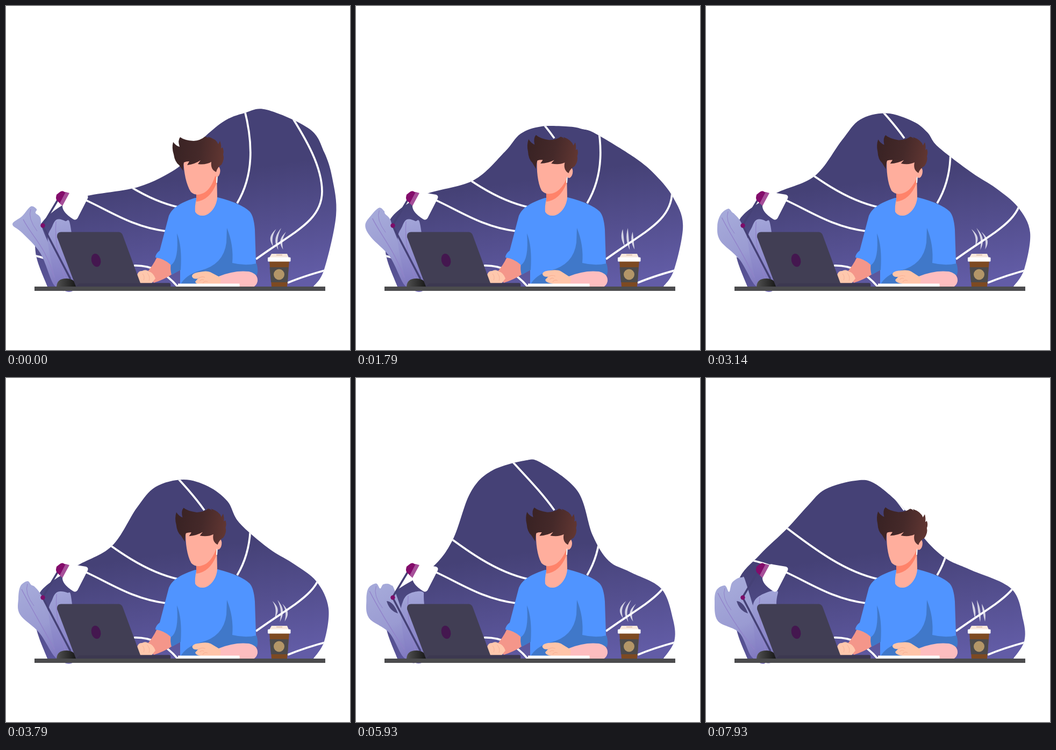
These frames come from a looping animation (640 px wide and 640 px high, 8 s). An HTML page with a canvas:

```html
<!DOCTYPE html>
<html lang="en">
<head>
<meta charset="utf-8">
<title>Working at a desk</title>
<style>
html, body { margin: 0; width: 100%; height: 100%; overflow: hidden; background: #fff; }
canvas { display: block; width: 100vw; height: 100vh; }
</style>
</head>
<body>
<canvas id="stage"></canvas>
<script>
const LOOP = 8000;
const canvas = document.getElementById('stage');
const ctx = canvas.getContext('2d');
const ratio = window.devicePixelRatio || 1;
canvas.width = canvas.height = 640 * ratio;

const pose = (time, text) => ({ time, points: text.split(' ').map(p => p.split(',').map(Number)) });

// The hill drifts between four key shapes; its feet stay put.
const hill = [
  pose(0, '66,404 130,359 245,337 315,304 334,283 352,260 403,216 444,199 485,193 565,229 592,272 607,320 614,390'),
  pose(2500, '62,395 122,350 207,320 262,258 295,220 341,210 395,228 412,241 430,255 500,303 545,333 583,370 606,415'),
  pose(5930, '66,404 140,354 180,301 212,215 250,174 312,154 345,158 412,210 440,292 470,340 510,361 568,392 590,450'),
  pose(7930, '60,378 100,329 151,280 190,237 222,207 278,191 315,197 370,245 405,297 445,335 490,356 568,392 590,450')
];
const leftFoot = [[77, 522], [55, 458]];
const rightFoot = [[592, 490], [572, 522]];

const bigLeaf = [
  pose(0, '12,406 30,391 46,373 57,378 55,385 64,394 70,420 112,520 90,520 64,460 30,422'),
  pose(3790, '23,410 27,387 40,378 47,385 53,388 63,400 74,422 112,520 92,520 62,474 26,440'),
  pose(7930, '16,415 20,394 35,386 43,398 49,380 66,371 76,386 112,520 86,520 62,474 22,452')
];
const smallLeaf = [
  pose(3000, '78,440 86,410 95,397 110,400 120,410 130,520 98,520'),
  pose(7930, '88,450 88,420 102,404 132,396 131,421 130,520 98,520')
];

const strands = [
  'M443 190 C460 255 461 315 430 367',
  'M145 275 C205 321 260 361 320 374',
  'M80 338 C165 355 210 408 298 419',
  'M526 197 C560 250 588 300 588 345 C588 400 535 420 465 471',
  'M524 515 Q560 500 612 487',
  'M238 483 C270 482 298 497 320 523',
  'M50 464 Q62 466 70 469',
  'M285 149 C315 182 345 212 369 246'
].map(d => new Path2D(d));

const lerp = (a, b, k) => a + (b - a) * k;
const clamp = x => Math.max(0, Math.min(1, x));

function blend(poses, t) {
  let i = 0;
  while (i < poses.length - 2 && t > poses[i + 1].time) i++;
  const a = poses[i], b = poses[i + 1];
  const k = clamp((t - a.time) / (b.time - a.time));
  return a.points.map(([x, y], n) => [lerp(x, b.points[n][0], k), lerp(y, b.points[n][1], k)]);
}

function smooth(pts, closed) {
  const n = pts.length, path = new Path2D();
  const at = i => closed ? pts[(i + n) % n] : pts[Math.max(0, Math.min(n - 1, i))];
  path.moveTo(...pts[0]);
  for (let i = 0; i < (closed ? n : n - 1); i++) {
    const [a, b, c, d] = [at(i - 1), at(i), at(i + 1), at(i + 2)];
    path.bezierCurveTo(
      b[0] + (c[0] - a[0]) / 6, b[1] + (c[1] - a[1]) / 6,
      c[0] - (d[0] - b[0]) / 6, c[1] - (d[1] - b[1]) / 6, c[0], c[1]);
  }
  path.closePath();
  return path;
}

function gradient(x0, y0, x1, y1, ...colors) {
  const g = ctx.createLinearGradient(x0, y0, x1, y1);
  colors.forEach((c, i) => g.addColorStop(i / (colors.length - 1), c));
  return g;
}

function fill(shape, color) {
  ctx.fillStyle = color;
  ctx.fill(typeof shape === 'string' ? new Path2D(shape) : shape);
}

function stroke(shape, color, width) {
  ctx.strokeStyle = color;
  ctx.lineWidth = width;
  ctx.stroke(typeof shape === 'string' ? new Path2D(shape) : shape);
}

function oval(x, y, rx, ry, color, turn = 0) {
  ctx.beginPath();
  ctx.ellipse(x, y, rx, ry, turn, 0, Math.PI * 2);
  ctx.fillStyle = color;
  ctx.fill();
}

function rect(x, y, w, h, color) {
  ctx.fillStyle = color;
  ctx.fillRect(x, y, w, h);
}

function rotated(x, y, degrees, draw) {
  ctx.save();
  ctx.translate(x, y);
  ctx.rotate(degrees * Math.PI / 180);
  ctx.translate(-x, -y);
  draw();
  ctx.restore();
}

function drawBackdrop(t) {
  const shape = smooth([...leftFoot, ...blend(hill, t), ...rightFoot], false);
  ctx.save();
  fill(shape, gradient(322, 322, 355, 535, '#454176', '#625ca6'));
  ctx.clip(shape);
  strands.forEach(s => stroke(s, '#fff', 3.7));
  ctx.restore();
}

function drawPlant(t) {
  const vein = '#9182ca';
  const big = blend(bigLeaf, t), small = blend(smallLeaf, t);
  fill(smooth(big, true), gradient(45, 390, 105, 520, '#a5a9d9', '#9a9bd2', '#7f77bf'));

  // The leaf's fold opens late in the loop.
  const gap = clamp((t - 4800) / 1100);
  ctx.save();
  ctx.translate(57, 415);
  ctx.scale(gap, gap);
  fill('M0 0 Q13 1 21 23 Q5 18 0 0 Z', '#4a467c');
  ctx.restore();

  const [x, y] = big[1], [lx, ly] = big[10], [tx, ty] = big[2];
  stroke(`M${x + 2} ${y + 6} C${x + 18} ${y + 38} ${lx + 42} ${ly + 22} 90 505`, vein, 1.3);
  stroke(`M${tx} ${ty + 5} Q${tx - 6} ${ty + 22} ${tx + 12} ${ty + 46}`, vein, 1);

  fill(smooth(small, true), gradient(95, 395, 110, 520, '#a3a6d9', '#8079c1'));
  const [sx, sy] = small[2];
  stroke(`M${sx - 2} ${sy + 4} Q${sx - 6} 450 112 512`, vein, 1.3);
}

function drawLamp() {
  stroke('M120 508 L68 408 L98 358', '#454176', 3.6);
  oval(68.5, 408.5, 4.2, 4.2, '#7d0d69');
  fill('M94 522 Q95 507 112 507 Q129 507 131 522 Z', gradient(94, 515, 131, 515, '#515151', '#161616'));
  fill('M117 348 Q120 345 125 347 L149 351 Q154 353 152 358 L133 395 Q129 400 124 396 Q104 383 105 371 Z', '#fff');
  fill('M99 347 Q104 342 109 346 L113 347 L102 369 L97 364 Q91 361 94 351 Z', '#830c6b');
  fill('M111 346 L118 348 L105 372 L100 367 Z', '#a64f99');
}

function drawBody() {
  const shirt = '#5094ff', shade = '#4078c9', skin = '#ffae9d';
  fill('M281 467 L308 474 L309 499 Q294 509 275 515 L261 497 Q273 484 281 467 Z', '#f4968a');
  fill('M246 516 L244 501 Q246 492 253 493 Q260 489 266 494 Q274 496 278 507 L271 516 Z', '#ffc8ad');
  stroke('M254 498 Q259 504 256 510 M263 497 Q269 504 266 511', '#f7b39a', 1);
  fill('M352 357 C330 364 307 374 302 394 L286 455 Q278 461 278 468 Q294 470 306 481 L308 500 L324 491 L324 522 L398 522 L466 499 Q469 488 465 478 L463 416 Q461 390 453 382 Q437 367 394 356 Z', shirt);
  fill('M318 423 Q328 447 325 491 L308 500 Q305 489 307 482 Q322 472 318 423 Z', shade);
  fill('M411 413 Q424 445 421 478 Q445 484 466 479 Q470 490 467 500 L398 522 L324 519 Q334 500 362 492 Q405 481 410 440 Z', shade);
  fill('M354 338 L354 360 Q351 372 352 383 Q357 391 367 390 C380 389 392 373 393 356 L392 310 Z', skin);
  fill('M354 345 L354 364 Q379 361 391 331 L391 315 Z', '#ff836a');
  stroke('M393 315 L392 329', '#fff', 2);
}

function drawHead(sway) {
  rotated(372, 360, 6.3 * sway, () => {
    oval(393, 308, 5.4, 10, '#ffae9d', 0.1);
    fill('M330 287 C331 310 335 332 344 346 Q352 353 362 350 C378 346 386 329 391 309 L391 280 Z', '#ffae9d');
    fill('M311 253 Q316 260 323 262 Q319 250 324 244 Q332 250 349 251 Q362 250 370 243 Q373 243 377 246 L375 243 Q391 247 395 257 L398 251 Q401 259 400 265 L403 263 Q406 270 404 276 Q407 285 401 295 Q393 300 391 309 Q380 304 382 290 Q372 296 357 294 L362 287 Q352 294 337 296 L341 289 Q335 289 331 291 Q329 298 330 307 L322 296 Q314 290 312 276 Q308 264 311 253 Z',
      gradient(316, 270, 404, 280, '#3a2324', '#452929', '#613632'));
  });
}

function drawRightArm(sway) {
  fill('M396 503 Q425 491 452 494 Q469 498 468 512 Q466 521 459 523 L394 522 Z', '#fdbdbf');
  rotated(396, 512, 6 * sway, () => {
    fill('M346 503 Q346 497 360 495 Q373 492 380 495 L399 505 Q401 512 396 523 L364 519 Q353 518 352 513 L357 507 Q348 509 346 503 Z', '#ffc5a9');
    stroke('M357 507 Q364 502 370 505 M360 512 Q364 507 368 510 M366 516 Q370 510 375 513', '#f8b094', 1);
  });
}

function drawLaptop() {
  fill('M95 430 Q94 421 102 420.5 L210 420.5 Q215 421 217 426 L250 515.5 L304 515.5 Q307 516 306 522 L130 522 Z', '#413e54');
  fill('M136 516 L304 515.5 Q307 516 306 522 L130 522 Z', '#3c3850');
  oval(167.5, 473, 8.6, 12.4, '#44174f', -0.25);
}

function drawSteam(t) {
  const angle = Math.PI * 2 * t / 5700;
  const lean = Math.cos(angle), bend = -Math.cos(angle - 0.87);
  for (const [x, top, end] of [[498, 415, 447], [507.5, 413, 454], [516.5, 420, 453]]) {
    const x0 = x + 4.5 * lean, x1 = x + 1 - 2 * lean;
    const h = end - top, ya = top + h * 0.4, yb = top + h * 0.65;
    const a = x + 8 * bend - lean, b = x + 6 * bend - 2 * lean;
    fill(`M${x0} ${top} C${a - 3} ${ya} ${b - 2.5} ${yb} ${x1} ${end} C${b + 2.5} ${yb} ${a + 3} ${ya} ${x0} ${top} Z`,
      'rgba(255,255,255,.74)');
  }
}

function drawCup() {
  fill('M490 474 L527 474 L523 522 L494 522 Z', '#7d4a22');
  fill('M490.5 486 L525.5 486 L524 514 L493 514 Z', '#4c4a4a');
  oval(508, 499.5, 10, 10, '#b39668');
  fill('M494 461 L523 461 L526 468 L490 468 Z', '#f8e9dd');
  rect(503, 462.5, 11, 1.6, '#d9b9a3');
  ctx.beginPath();
  ctx.roundRect(487, 467.5, 42.5, 8, 1.5);
  ctx.fillStyle = '#fff';
  ctx.fill();
}

// Back-and-forth swing, slowing a little at the far end
function swing(t) {
  const half = 2375;
  const u = 1 - Math.abs((t / half) % 2 - 1);
  return (u + Math.sin(u * Math.PI / 2)) / 2;
}

function draw(t) {
  ctx.setTransform(ratio, 0, 0, ratio, 0, 0);
  rect(0, 0, 640, 640, '#fff');
  const sway = swing(t);
  drawBackdrop(t);
  drawPlant(t);
  drawLamp();
  drawBody();
  drawHead(sway);
  drawRightArm(sway);
  drawLaptop();
  rect(320, 516.5, 114.5, 6, '#fff');
  drawSteam(t);
  drawCup();
  rect(53, 522, 541, 8, '#4b4b4d');
}

function tick() {
  draw(performance.now() % LOOP);
  requestAnimationFrame(tick);
}
tick();
</script>
</body>
</html>
```
